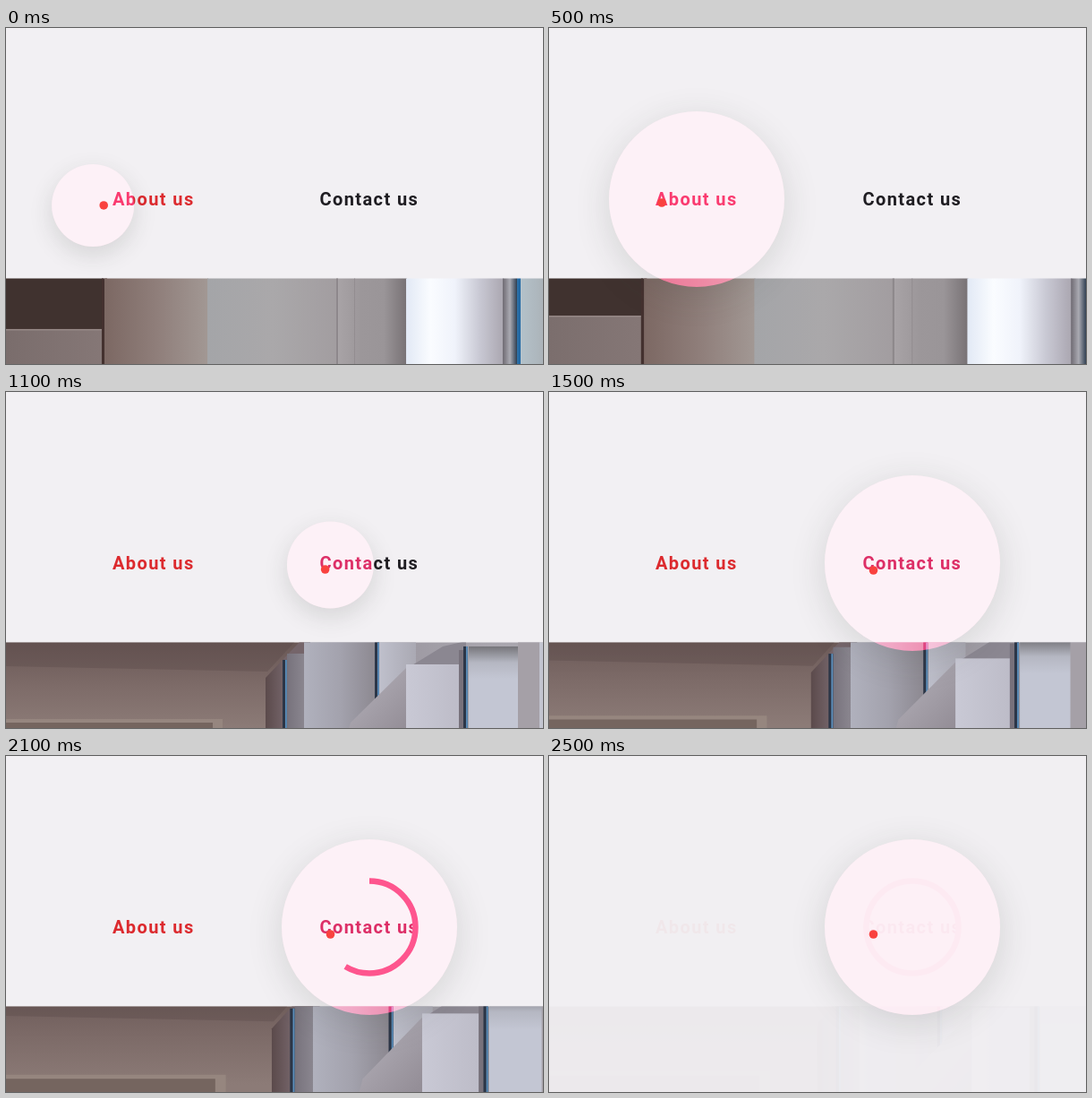
Write an HTML page with a canvas that moves like this. It is 600 px wide and 375 px high and loops after 2.6 s.

```html
<!DOCTYPE html>
<html lang="en">
<head>
<meta charset="utf-8">
<title>Menu hover</title>
<style>
html, body { margin: 0; width: 100%; height: 100%; overflow: hidden; background: #f2f0f3; }
canvas { display: block; }
</style>
</head>
<body>
<canvas id="stage" width="600" height="375"></canvas>
<script>
const ctx = document.getElementById('stage').getContext('2d');
const W = 600, H = 375, LOOP = 2600, TOP = 279.4;
const PAPER = '#f2f0f3';

const clamp = v => Math.max(0, Math.min(1, v));
const span = (t, a, b) => clamp((t - a) / (b - a));
const ease = {
  linear: p => p,
  out: p => 1 - (1 - p) ** 3,
  inOut: p => p * p * (3 - 2 * p)
};

// Each key: time, easing towards it, values
const dotKeys = [
  [0, 'linear', 109, 198],
  [220, 'out', 125, 196],
  [500, 'linear', 126, 195],
  [1100, 'inOut', 356.5, 198],
  [1250, 'out', 362.5, 199]
];
const lensKeys = [
  [0, 'linear', 97, 198, 46],
  [60, 'linear', 103, 197.5, 46],
  [430, 'out', 165, 191, 98],
  [510, 'linear', 165, 191, 98],
  [700, 'out', 180, 194, 52],
  [800, 'linear', 222, 196, 46],
  [1050, 'linear', 342, 197, 46],
  [1100, 'linear', 362, 193, 48],
  [1430, 'out', 406, 191, 98]
];

function sample(keys, t) {
  const i = keys.findIndex(k => k[0] > t);
  if (i < 0) return keys[keys.length - 1].slice(2);
  const a = keys[i - 1], b = keys[i];
  const p = ease[b[1]](span(t, a[0], b[0]));
  return a.slice(2).map((v, n) => v + (b[n + 2] - v) * p);
}

function rect(x0, y0, x1, y1, fill) {
  ctx.fillStyle = fill;
  ctx.fillRect(x0, y0, x1 - x0, y1 - y0);
}

function gradient(x0, y0, x1, y1, colors) {
  const g = ctx.createLinearGradient(x0, y0, x1, y1);
  colors.forEach((c, i) => g.addColorStop(i / (colors.length - 1), c));
  return g;
}
const across = (x0, x1, ...colors) => gradient(x0, 0, x1, 0, colors);
const down = (y0, y1, ...colors) => gradient(0, y0, 0, y1, colors);

function poly(fill, ...pts) {
  ctx.fillStyle = fill;
  ctx.beginPath();
  pts.forEach(([x, y]) => ctx.lineTo(x, y));
  ctx.fill();
}

function disc(x, y, r) {
  ctx.beginPath();
  ctx.arc(x, y, r, 0, Math.PI * 2);
}

function hallway(p) {
  ctx.translate(-11.8 * p, 0);
  ctx.scale(1 + 0.072 * p, 1);
  const y = 336 - 15 * p;
  rect(0, 270, 109, 400, '#40322f');
  rect(0, y, 107, 400, across(0, 107, '#7a6d6c', '#857776'));
  rect(0, y, 107, y + 1.5, '#968886');
  rect(107, 270, 113, 400, '#44312f');
  rect(110, 270, 226, 400, across(110, 226, '#7c6863', '#8f7e7a', '#a29894'));
  rect(225, 270, 371, 400, across(225, 371, '#a4a5a8', '#aaa8aa', '#a29da0'));
  rect(369, 270, 371, 400, '#8d888b');
  rect(371, 270, 448, 400, across(371, 448, '#a8a3a6', '#9c979a', '#9a9598', '#777174'));
  rect(389, 270, 390, 400, '#928d90');
  rect(447, 270, 556, 400, across(447, 556, '#e2e9f5', '#fafcff', '#f0f3fb', '#c9c9d4', '#aaa6b0'));
  rect(555, 270, 571, 400, across(555, 571, '#6e6a72', '#aaaab2', '#2d3d50'));
  rect(571, 270, 575, 400, '#256ba5');
  rect(575, 270, 640, 400, across(575, 610, '#b4c2ca', '#a8adb2'));
}

// Dark window frame with a thin blue glint
function frameBar(x, y0, y1) {
  rect(x - 3, y0, x + 2, y1, '#2c3647');
  rect(x, y0, x + 1.8, y1, '#5d90bd');
}

function gallery(p) {
  ctx.translate(-16 * p, -64 * p);
  ctx.scale(1 + 0.084 * p, 1 + 0.145 * p);
  rect(0, 260, 340, 400, down(280, 375, '#6a5856', '#7d6b68', '#8c7b77'));
  poly('rgba(85, 68, 66, 0.3)', [0, 260], [340, 260], [292, 312], [0, 306]);
  rect(0, 365, 242, 400, '#96867f');
  rect(0, 369, 231, 400, '#75655f');

  poly(across(290, 312, '#5b4a4b', '#75656a'),
    [290, 400], [290, 319], [328, 279], [340, 279], [340, 400]);
  rect(314, 292, 334, 400, across(314, 334, '#77727c', '#8b8790'));
  frameBar(312, 299, 400);

  rect(333, 260, 640, 400, across(333, 640, '#a4a3ad', '#9c98a1', '#a9a6ae', '#aaa8b0'));
  rect(333, 260, 415, 400, across(333, 415, '#b0b1bd', '#a3a2ad', '#8b878f'));
  rect(417, 260, 458, 400, across(417, 458, '#bfc0cc', '#aaa9b3'));
  frameBar(415, 260, 350);
  poly('#8b8791', [452, 306], [488, 284], [514, 278], [514, 310]);
  poly(gradient(400, 330, 447, 375, ['#aca8b1', '#948e97']),
    [376, 400], [385, 369], [447, 308], [447, 400]);
  rect(447, 304, 507, 400, across(447, 507, '#c9c9d5', '#bdbcc8'));

  rect(506, 288, 514, 400, '#77717b');
  rect(517, 284, 572, 400, down(284, 320, '#76757a', '#b5b7c2', '#c3c6d3'));
  frameBar(514, 284, 400);
  rect(572, 260, 596, 400, '#a5a0a7');
  rect(596, 260, 640, 400, '#c3c5d0');
}

function passer(t) {
  const x = 608 + Math.abs(t - 1930) * 0.22;
  ctx.fillStyle = '#35201f';
  ctx.beginPath();
  ctx.ellipse(x, 362, 31, 55, 0, 0, Math.PI * 2);
  ctx.fill();
}

function film(t) {
  ctx.save();
  ctx.beginPath();
  ctx.rect(0, TOP, W, H - TOP);
  ctx.clip();
  ctx.save();
  if (t < 800) hallway(t / 500);
  else gallery((t - 1100) / 1200);
  ctx.restore();
  if (t > 1600 && t < 2260) passer(t);
  ctx.restore();
}

function link(text, x, color) {
  ctx.font = '600 20px Roboto, sans-serif';
  ctx.letterSpacing = '1.4px';
  ctx.fillStyle = color;
  ctx.fillText(text, x, 198);
}

function progress(t) {
  const p = ease.inOut(span(t, 1900, 2260));
  if (!p) return;
  ctx.strokeStyle = '#fa465a';
  ctx.lineWidth = 6.5;
  ctx.beginPath();
  ctx.arc(406, 191, 51.5, -Math.PI / 2, -Math.PI / 2 + Math.PI * 2 * p);
  ctx.stroke();
}

function lens(x, y, r) {
  // Soft shadow only outside the disc
  ctx.save();
  ctx.beginPath();
  ctx.rect(0, 0, W, H);
  ctx.arc(x, y, r, 0, Math.PI * 2);
  ctx.clip('evenodd');
  ctx.shadowColor = 'rgba(50, 55, 50, 0.15)';
  ctx.shadowBlur = 14 + 0.26 * r;
  ctx.shadowOffsetX = 2000;
  ctx.shadowOffsetY = 9;
  ctx.fillStyle = '#000';
  disc(x - 2000, y, r);
  ctx.fill();
  ctx.restore();

  ctx.save();
  ctx.globalCompositeOperation = 'screen';
  ctx.fillStyle = '#d81450';
  disc(x, y, r);
  ctx.fill();
  ctx.restore();
}

function draw(t) {
  rect(0, 0, W, H, PAPER);
  film(t);
  link('About us', 119, '#dc2a2e');
  link('Contact us', 350.5, '#1f1d22');
  progress(t);

  ctx.globalAlpha = span(t, 2180, 2515);
  rect(0, 0, W, H, PAPER);
  ctx.globalAlpha = 1;

  lens(...sample(lensKeys, t));
  const [x, y] = sample(dotKeys, t);
  ctx.fillStyle = '#f9423f';
  disc(x, y, 4.8);
  ctx.fill();
}

const start = performance.now();
function tick() {
  draw((performance.now() - start) % LOOP);
  requestAnimationFrame(tick);
}
tick();
</script>
</body>
</html>
```
